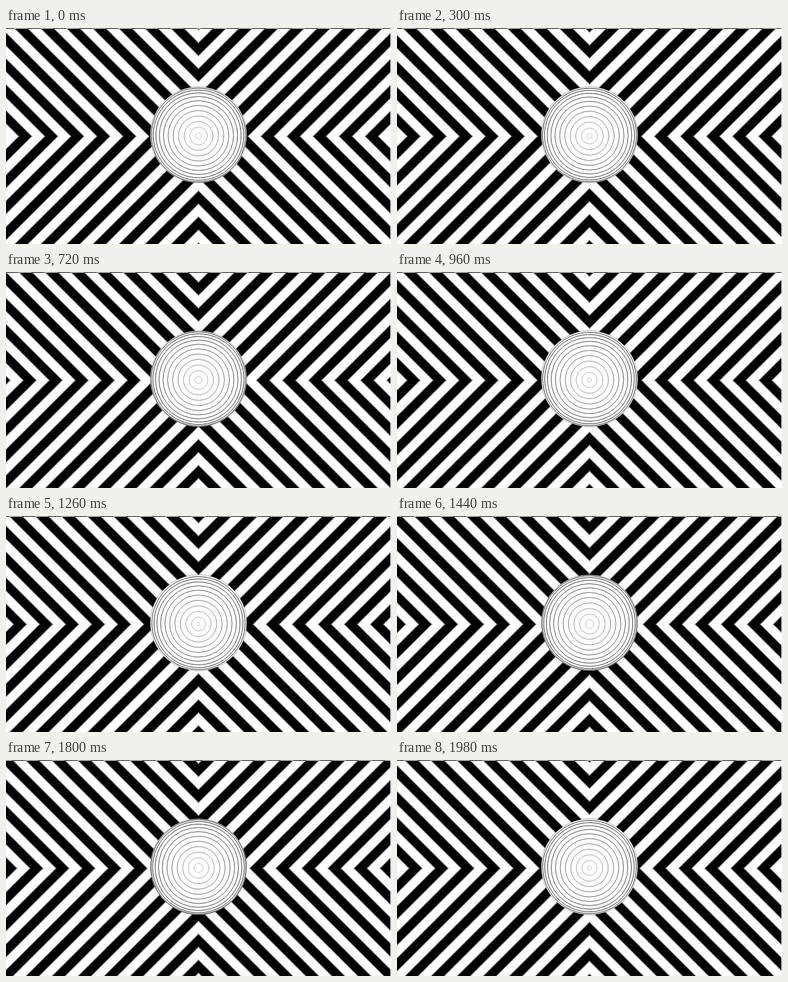
An HTML page with a canvas that plays this animation: 625 by 352 pixels, repeating every 2.04 s.

```html
<!DOCTYPE html>
<html lang="en">
<head>
<meta charset="utf-8">
<title>Stripes and sphere</title>
<style>
  html, body { margin: 0; width: 100%; height: 100%; overflow: hidden; background: #fff; }
  canvas { display: block; }
</style>
</head>
<body>
<canvas id="stage" width="625" height="352"></canvas>
<script>
const W = 625, H = 352, STEP = 60, STEPS = 34;
const CX = 312.5, CY = 176.5;

// Chevron stripes: bands of |dx| - |dy| sliding towards the middle.
const PERIOD = 42.3, START = 270.6, SPEED = 7.655, SOFT = 3.4;

// Sphere: rings flowing outwards, spaced a little wider near the rim.
const R = 78, DISC_Y = 174, RIM = 82;
const RING_START = 0.57, RING_SPEED = 0.175;

const ctx = document.getElementById('stage').getContext('2d');
const image = ctx.createImageData(W, H);
const pixels = new Uint32Array(image.data.buffer);
const mod = (a, b) => ((a % b) + b) % b;
const ringAngle = x => 6.6 * x + 0.08 * x * x;

function shade(u, shift) {
  const p = mod(u - START + shift, PERIOD);
  const half = PERIOD / 2;
  const depth = p < half ? Math.min(p, half - p) : -Math.min(p - half, PERIOD - p);
  return Math.round(255 * Math.max(0, Math.min(1, 0.5 - depth / SOFT)));
}

function drawStripes(n) {
  const shift = n * SPEED;
  // One shade for every half-pixel value of |dx| - |dy|.
  const offset = H + 2;
  const table = new Uint32Array(W + H + 4);
  for (let i = 0; i < table.length; i++) {
    const v = shade((i - offset) / 2, shift);
    table[i] = (0xff000000 | v << 16 | v << 8 | v) >>> 0;
  }
  for (let y = 0; y < H; y++) {
    const dy = Math.abs(y + 0.5 - CY);
    for (let x = 0; x < W; x++) {
      const u = Math.abs(x + 0.5 - CX) - dy;
      const c = table[Math.round(u * 2) + offset];
      // The top row runs in the opposite tone.
      pixels[y * W + x] = x === W - 1 ? 0xffffffff : y ? c : (c ^ 0xffffff) >>> 0;
    }
  }
  ctx.putImageData(image, 0, 0);
}

function circle(y, r) {
  ctx.beginPath();
  ctx.arc(CX, y, r, 0, Math.PI * 2);
}

function drawSphere(n) {
  circle(DISC_Y, R + 0.3);
  ctx.fillStyle = '#fff';
  ctx.fill();
  ctx.lineWidth = 1;
  ctx.strokeStyle = 'rgba(0,0,0,.35)';
  ctx.stroke();

  const phase = mod(RING_START + n * RING_SPEED, 1);
  for (let x = phase; ringAngle(x) < RIM; x++) {
    const a = ringAngle(x) * Math.PI / 180;
    const s = Math.sin(a);
    circle(DISC_Y + 2 * Math.cos(a), R * s);
    ctx.strokeStyle = `rgba(0,0,0,${0.2 + 0.65 * s})`;
    ctx.stroke();
  }
}

let shown = -1;
const begin = performance.now();

function tick() {
  const n = Math.floor((performance.now() - begin) / STEP) % STEPS;
  if (n !== shown) {
    shown = n;
    drawStripes(n);
    drawSphere(n);
  }
  requestAnimationFrame(tick);
}
tick();
</script>
</body>
</html>
```
